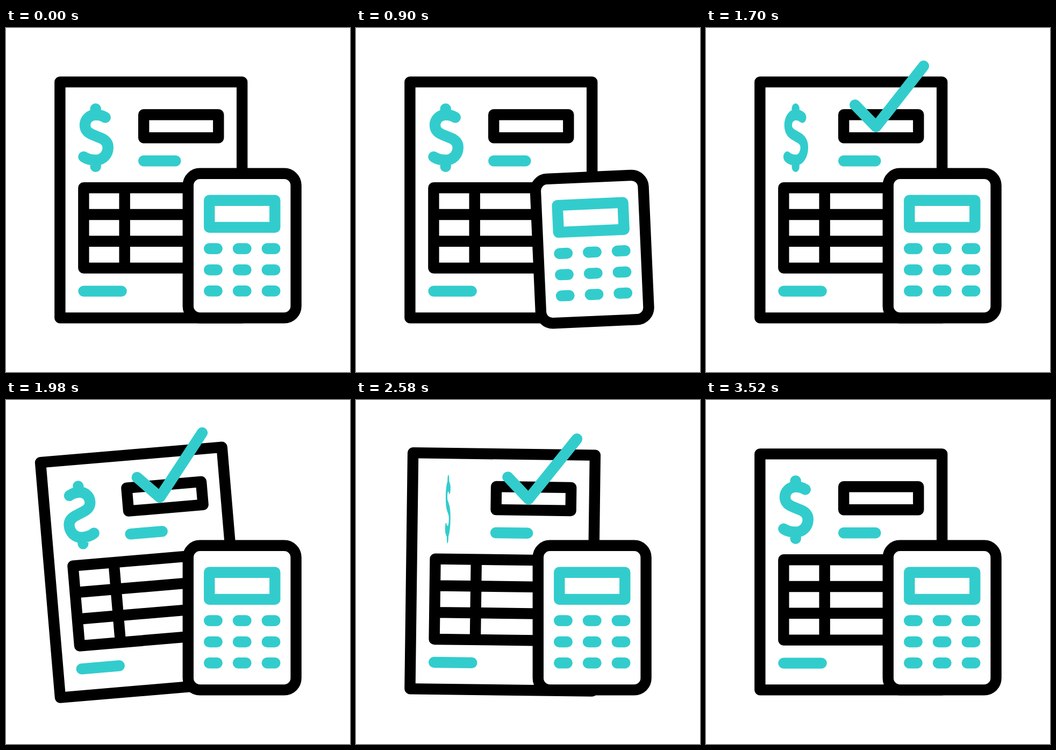
Recreate the animation shown at these times as an HTML page. Size 640 px wide and 640 px high, loop 3.6 s.

```html
<!DOCTYPE html>
<html lang="en">
<head>
<meta charset="utf-8">
<title>Invoice and calculator</title>
<style>
  html, body { margin: 0; width: 100%; height: 100%; overflow: hidden; background: #fff; }
  svg { display: block; width: 100vw; height: 100vh; }
  g { fill: #fff; stroke: #000; stroke-width: 20.4; stroke-linecap: round; stroke-linejoin: round; }
  .teal { stroke: #3cc; }
  .line { fill: none; }
</style>
</head>
<body>
<svg viewBox="0 0 640 640">
  <g id="sheet">
    <path d="M100.4 100.4H439.2V539.4H100.4Z"/>
    <path d="M256.2 161.2H395.3V204.3H256.2Z"/>
    <path d="M144.4 297.2H395V446.6H144.4ZM144.4 347H395M144.4 396.7H395M220.7 297.2V446.6"/>
    <path class="teal" d="M256.2 247.2H315.4M144.5 489.6H214.7"/>
    <g id="dollar" class="teal line">
      <path d="M184.7 166.3C179 163 173 161.5 167 161.5C156 161.5 147 169.5 147 180.5C147 190 152 194.5 160 198L174 203.8C184 207.5 189.8 213 189.8 222C189.8 235.5 180 245.8 167 245.8C158 245.8 151.5 244.5 144.5 239.8M166.7 150.4V160M166.7 247V257.8"/>
    </g>
    <path id="tick" class="teal line" pathLength="1" d="M277.2 143.2L316.3 183.7L404.9 70.7"/>
  </g>
  <g id="calc">
    <rect x="338.8" y="270.8" width="200.8" height="268.6" rx="22"/>
    <path id="screen" d="M378.3 320.8H500.3V370.9H378.3Z"/>
    <path id="keys" class="teal"/>
  </g>
</svg>
<script>
  const LOOP = 3600;
  const [sheet, dollar, tick, calc, screen, keys] =
    ['sheet', 'dollar', 'tick', 'calc', 'screen', 'keys'].map(id => document.getElementById(id));

  keys.setAttribute('d', [410.5, 450, 489.3].flatMap(y =>
    [378.2, 432, 485.8].map(x => `M${x} ${y}h14.5`)).join(''));

  // Sine ease from 0 to 1 between two times
  const ease = (t, from, to) => {
    const p = Math.min(1, Math.max(0, (t - from) / (to - from)));
    return (1 - Math.cos(Math.PI * p)) / 2;
  };
  const hop = (t, peak, half) => ease(t, peak - half, peak) - ease(t, peak, peak + half);

  function draw(t) {
    // Calculator dips and tilts twice; its screen flashes after each dip
    const dip = hop(t % 800, 200, 200) * (t < 1600);
    calc.setAttribute('transform', `translate(0 ${12.8 * dip}) rotate(${-5 * dip} 439.2 405.1)`);
    const flash = t < 1600 && t % 800 >= 600;
    screen.setAttribute('stroke', flash ? '#000' : '#3cc');
    screen.setAttribute('stroke-width', flash ? 23 : 20.4);

    // Sheet dips once, then sways
    const drop = hop(t, 1400, 160);
    const wave = Math.cos(2 * Math.PI * t / 800);
    const sway = t < 2000 ? -ease(t, 1840, 2000)
      : t < 3200 ? -Math.cos(2 * Math.PI * (t - 2000) / 800)
      : 1 - ease(t, 3200, 3520);
    sheet.setAttribute('transform',
      `translate(0 ${16.2 * drop}) rotate(${5 * (sway - drop)} 269.8 539.4)`);

    const turn = t > 1600 && t < 3200 ? wave : 1;
    dollar.setAttribute('transform', `translate(166.7 0) scale(${turn} 1) translate(-166.7 0)`);

    // Tick is drawn from its start and later wiped from its start
    const head = ease(t, 1200, 1600), tail = ease(t, 2800, 3200);
    tick.style.display = head - tail > 0.0005 ? '' : 'none';
    tick.setAttribute('stroke-dasharray', `${head - tail} 2`);
    tick.setAttribute('stroke-dashoffset', -tail);
  }

  const start = performance.now();
  function frame() {
    draw((performance.now() - start) % LOOP);
    requestAnimationFrame(frame);
  }
  frame();
</script>
</body>
</html>
```
